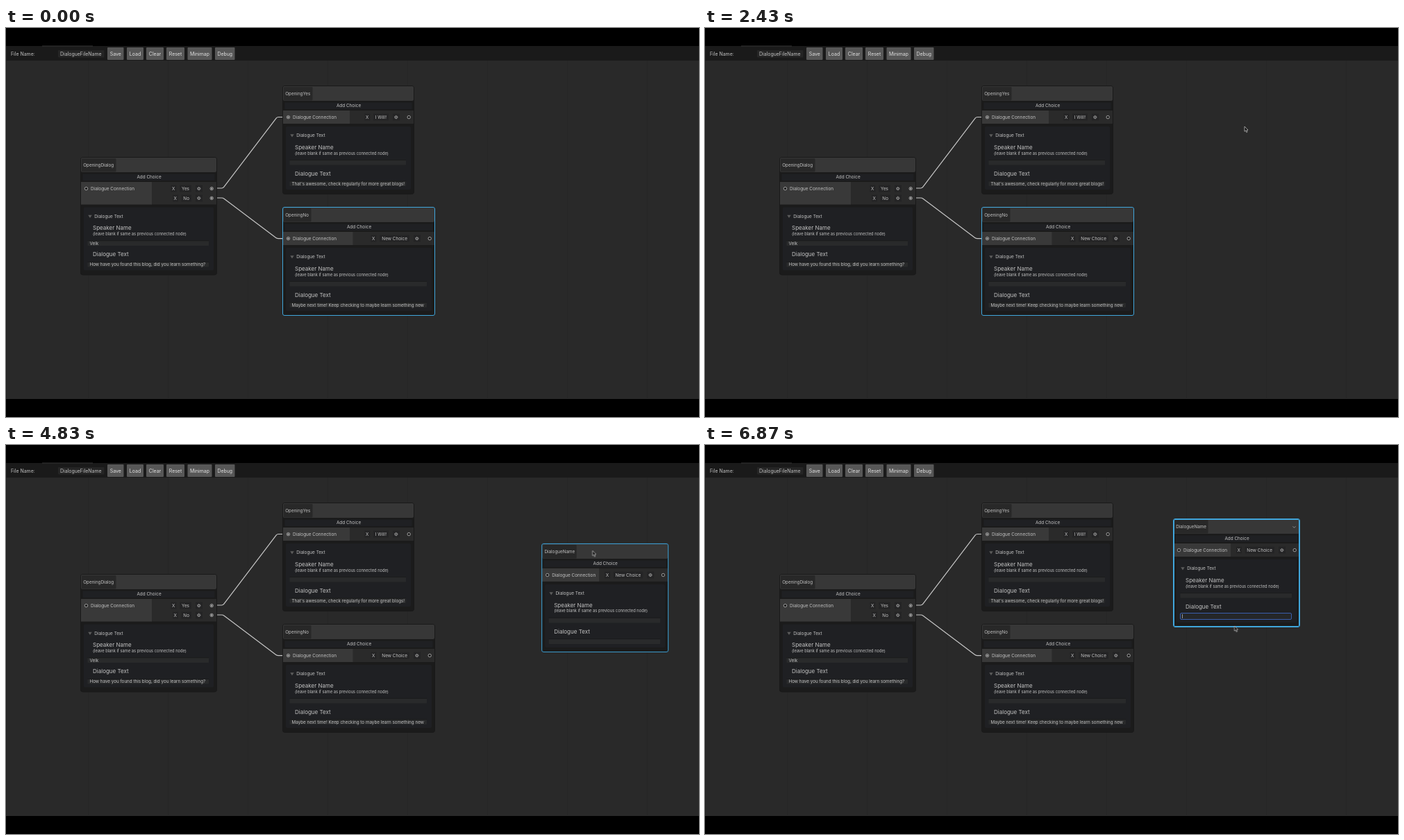
Animation of 998x561 px, one loop 8000 ms. Source, as an HTML page:

```html
<!DOCTYPE html>
<html lang="en">
<head>
<meta charset="utf-8">
<title>Dialogue graph</title>
<style>
html, body { margin: 0; width: 100%; height: 100%; overflow: hidden; background: #000; }
svg { display: block; width: 100vw; height: 100vh; }
text { font-family: Inter, sans-serif; fill: #c2c2c2; white-space: pre; }
.menu text { font-family: "Noto Sans", sans-serif; fill: #3b94c4; }
.menu .lit text { fill: #d9effa; }
.menu .off { fill: #26465f; }

/* One loop is 8 s, so 1% is 80 ms */
.cursor, .drag { animation: 8s linear infinite; }
.step, .row { animation: 8s step-end infinite; }
.cursor { animation-name: point; }
.drag { animation-name: drag; }
.arrow { animation-name: arrow; }
.beam { animation-name: beam; }
.menu { animation-name: menu; }
.row { animation-name: row; }
.fresh { animation-name: fresh; }
.ring-no { animation-name: ringNo; }
.ring-new { animation-name: ringNew; }
.fold-no, .inner-no { animation-name: hoverNo; }
.fold-new { animation-name: foldNew; }
.inner-new { animation-name: innerNew; }
.name-hover { animation-name: nameHover; }
.focus { animation-name: focus; }

@keyframes point {
  0%, 7.125% { transform: translate(560px, 402px); }
  10.5% { transform: translate(800px, 290px); animation-timing-function: ease-out; }
  13% { transform: translate(948px, 222px); animation-timing-function: ease-in-out; }
  17.125%, 17.875% { transform: translate(700px, 285px); animation-timing-function: ease-out; }
  20.5%, 22.5% { transform: translate(611px, 304.5px); animation-timing-function: ease-in-out; }
  27.875%, 28.375% { transform: translate(748px, 159px); animation-timing-function: ease-out; }
  30.375%, 33.375% { transform: translate(777px, 142px); }
  36% { transform: translate(795px, 165px); }
  40.875% { transform: translate(814px, 230.5px); }
  43.375%, 45% { transform: translate(836px, 246px); animation-timing-function: ease-in-out; }
  53.75%, 58% { transform: translate(850px, 152.5px); }
  60.375% { transform: translate(845px, 152.5px); }
  64.125% { transform: translate(750.5px, 118px); }
  65%, 65.5% { transform: translate(747.5px, 116.5px); }
  67.125%, 71.625% { transform: translate(699.5px, 125.5px); }
  76% { transform: translate(735px, 195px); animation-timing-function: ease-out; }
  80%, 82.5% { transform: translate(765px, 247px); }
  85.875%, 100% { transform: translate(762.5px, 261px); }
}
@keyframes drag {
  0%, 58% { transform: translate(102.5px, 36px); }
  60.375% { transform: translate(97.5px, 36px); }
  64.125% { transform: translate(3px, 1.5px); }
  65%, 100% { transform: none; }
}
@keyframes arrow {
  0% { opacity: 0; } 7.7% { opacity: 1; } 66.3% { opacity: 0; }
  72% { opacity: 1; } 79.3% { opacity: 0; } 83.5%, 100% { opacity: 1; }
}
@keyframes beam {
  0% { opacity: 0; } 7.125% { opacity: 1; } 7.7% { opacity: 0; }
  66.3% { opacity: 1; } 72% { opacity: 0; } 79.3% { opacity: 1; } 83.5%, 100% { opacity: 0; }
}
@keyframes menu { 0% { opacity: 0; } 33.375% { opacity: 1; } 45%, 100% { opacity: 0; } }
@keyframes row {
  0% { transform: translateY(-300px); }
  34% { transform: translateY(141px); }
  35.2% { transform: translateY(158px); }
  36.7% { transform: translateY(174px); }
  37.9% { transform: translateY(-300px); }
  39.1% { transform: translateY(206.5px); }
  40.3% { transform: translateY(224px); }
  42.5%, 100% { transform: translateY(241px); }
}
@keyframes fresh { 0% { opacity: 0; } 45%, 100% { opacity: 1; } }
@keyframes ringNo { 0% { opacity: 1; } 55%, 100% { opacity: 0; } }
@keyframes ringNew { 0% { opacity: .5; } 55%, 100% { opacity: 1; } }
@keyframes hoverNo { 0% { opacity: 0; } 7.125% { opacity: 1; } 8.1%, 100% { opacity: 0; } }
@keyframes foldNew { 0% { opacity: 1; } 55% { opacity: 0; } 65.5%, 100% { opacity: 1; } }
@keyframes innerNew { 0% { opacity: 0; } 65.5%, 100% { opacity: 1; } }
@keyframes nameHover { 0% { opacity: 0; } 66.3% { opacity: 1; } 72%, 100% { opacity: 0; } }
@keyframes focus { 0% { opacity: 0; } 80.5%, 100% { opacity: 1; } }
</style>
</head>
<body>
<svg id="stage" viewBox="0 0 998 561" preserveAspectRatio="none"></svg>
<script>
const rect = (x, y, w, h, fill, extra = '') =>
  `<rect x="${x}" y="${y}" width="${w}" height="${h}" fill="${fill}" ${extra}/>`;

// y is the middle of the capitals
const label = (str, x, y, size = 6.4, extra = '') =>
  `<text x="${x}" y="${y + size * 0.36}" font-size="${size}" ${extra}>${str}</text>`;

const MIDDLE = 'text-anchor="middle"';

const port = (x, y, linked) =>
  `<circle cx="${x}" cy="${y}" r="2.2" fill="#1c1c1c" stroke="#bcbcbc" stroke-width=".8"/>` +
  (linked ? `<circle cx="${x}" cy="${y}" r="1.2" fill="#c0c0c0"/>` : '');

const gear = (x, y) =>
  `<circle cx="${x}" cy="${y}" r="2.2" fill="none" stroke="#a4a4a4" stroke-width=".9" stroke-dasharray="1 .73"/>` +
  `<circle cx="${x}" cy="${y}" r="1.4" fill="none" stroke="#a4a4a4" stroke-width="1"/>`;

const field = (x, y, w, value) =>
  rect(x, y, w, 7.5, '#292a2b', 'rx="1"') +
  rect(x, y, w, 0.7, '#161617') +
  label(value, x + 3, y + 4, 6.3);

function choice(right, y, { text, width, linked }) {
  const start = right - 39 - width;
  const box = (x, w) => rect(x, y - 5, w, 10, '#242425', 'rx="1"');
  return box(start - 15.5, 8) + label('X', start - 11.7, y, 6.4, MIDDLE) +
    box(start - 3, width + 6) + label(text, right - 39, y, 6.4, 'text-anchor="end"') +
    box(right - 30, 10) + gear(right - 25.2, y) +
    port(right - 6.8, y, linked);
}

// The outer ring marks selection, the inner one thickens it on hover
function selection(x, y, w, h, tag) {
  const ring = (inset, cls) =>
    rect(x + inset, y + inset, w - 2 * inset, h - 2 * inset, 'none', `class="step ${cls}-${tag}" rx="${3 - inset}" stroke="#40a6dc"`);
  return ring(0.5, 'ring') + ring(1.5, 'inner') +
    `<path class="step fold-${tag}" d="M${x + w - 10.5} ${y + 11.3}l2 2 2-2" fill="none" stroke="#aaa" stroke-width=".8"/>`;
}

function node({ x, y, w, name, nameW, inW, linked, choices, speaker = '', line = '', tag }) {
  const grow = (choices.length - 1) * 13.5;
  const right = x + w;
  const b = y + grow;
  return rect(x - 0.5, y - 0.5, w + 1, 156 + grow, '#1b1b1b', 'rx="3" stroke="#191919"') +
    rect(x, y, w, 21, '#373737', 'rx="2"') +
    rect(x + 1, y + 1, nameW, 19.5, '#282828', 'rx="1"') +
    label(name, x + 3.3, y + 11, 6.3) +
    rect(x + 2.5, y + 23.5, w - 5, 9.5, '#1f2023', 'rx="1"') +
    label('Add Choice', x + w / 2 + 0.5, y + 28, 6.4, MIDDLE) +
    rect(x, y + 35, w, 19 + grow, '#2a2a2a') +
    rect(x, y + 35, inW, 19 + grow, '#393939') +
    port(x + 7.5, y + 44.6, linked) +
    label('Dialogue Connection', x + 14, y + 44.6) +
    choices.map((c, i) => choice(right, y + 44.6 + i * 13.8, c)).join('') +
    rect(x + 4, b + 58, w - 8, 91, '#1f2023', 'rx="2"') +
    `<path d="M${x + 10.3} ${b + 69.3}h5.4l-2.7 4.2z" fill="#5c5c5c"/>` +
    label('Dialogue Text', x + 19.3, b + 71) +
    label('Speaker Name', x + 17, b + 88, 8) +
    label('(leave blank if same as previous connected node)', x + 17, b + 96.5, 5.75) +
    field(x + 9.5, b + 106, w - 20.5, speaker) +
    label('Dialogue Text', x + 17, b + 126, 8) +
    field(x + 9.5, b + 136.5, w - 20.5, line) +
    (tag ? selection(x - 1, y - 1, w + 2, 157 + grow, tag) : '');
}

// A slanted link between two short stubs, with softened corners
function edge(y1, y2) {
  const [x1, x2] = [312.5, 390.3];
  const len = Math.hypot(x2 - x1, y2 - y1);
  const dx = (x2 - x1) / len * 2, dy = (y2 - y1) / len * 2;
  return `<path d="M304 ${y1}H${x1 - 2}Q${x1} ${y1} ${x1 + dx} ${y1 + dy}` +
    `L${x2 - dx} ${y2 - dy}Q${x2} ${y2} ${x2 + 2} ${y2}H399" fill="none" stroke="#c6c6c6" stroke-width="1.2"/>`;
}

const buttons = [['Save', 146, 23.5], ['Load', 174, 24], ['Clear', 202, 25],
  ['Reset', 231, 26], ['Minimap', 261.5, 35], ['Debug', 301, 28.5]];

const gridLines = Array.from({ length: 8 }, (_, i) => rect(118 + i * 115, 47, 0.8, 487, '#262626')).join('');

const backdrop =
  rect(0, 0, 998, 561, '#000') +
  rect(0, 26, 998, 508.5, '#292929') + gridLines +
  rect(0, 26, 998, 21, '#1a1a1a') +
  rect(52, 25.5, 73, 1, '#363636') +
  rect(0, 47, 0.8, 487, '#1d1d1d') +
  rect(0, 534, 998, 0.7, '#343434') +
  label('File Name:', 7, 37, 6.95) +
  rect(75, 32, 66.5, 10.5, '#252525', 'rx="1"') +
  label('DialogueFileName', 78, 37, 6.95) +
  buttons.map(([str, x, w]) =>
    rect(x, 28, w, 18, '#575757', 'rx="1"') +
    label(str, x + w / 2, 37, 6.95, MIDDLE + ' style="fill:#e2e2e2"')).join('');

const opening = node({
  x: 108, y: 187, w: 195, name: 'OpeningDialog', nameW: 49.5, inW: 102, speaker: 'Velk',
  line: 'How have you found this blog, did you learn something?',
  choices: [{ text: 'Yes', width: 11, linked: true }, { text: 'No', width: 8.5, linked: true }]
});
const yes = node({
  x: 399, y: 84, w: 188, name: 'OpeningYes', nameW: 41.5, inW: 96, linked: true,
  line: "That's awesome, check regularly for more great blogs!",
  choices: [{ text: 'I Will!', width: 16 }]
});
const no = node({
  x: 399, y: 259, w: 218, name: 'OpeningNo', nameW: 39.5, inW: 100.5, linked: true, tag: 'no',
  line: 'Maybe next time! Keep checking to maybe learn something new',
  choices: [{ text: 'New Choice', width: 37 }]
});
const added = node({
  x: 675, y: 107, w: 181, name: 'DialogueName', nameW: 48.5, inW: 82, tag: 'new',
  choices: [{ text: 'New Choice', width: 36.5 }]
}) +
  rect(676, 109, 48.5, 18, 'none', 'class="step name-hover" rx="1" stroke="#666" stroke-width=".8"') +
  `<g class="step focus">${rect(684.5, 242.5, 160, 9, '#252729', 'rx="1.5" stroke="#3a5fae"')}` +
  `${rect(687.3, 244, 0.7, 6, '#c8c8c8')}</g>`;

const items = [['Create Node', 149], ['Cut', 166], ['Copy', 182], ['Paste', 197.5, 'off'], ['Delete', 214.5],
  ['Duplicate', 232], ['Add Node (Multiple Choice)', 249], ['Add Group', 265]];
const itemLabels = items.map(([str, y, cls = '']) => label(str, 792.7, y, 7.4, `class="${cls}"`)).join('');
const rowRect = rect(776.8, 0, 128, 16, '#41aadd', 'class="row"');

const menu = `<clipPath id="rowClip">${rowRect}</clipPath><g class="step menu">` +
  rect(776, 140.5, 129.5, 132.5, '#141727', 'stroke="#1b2037" stroke-width=".8"') +
  [157.5, 206, 223, 240.5].map(y => rect(777, y, 128, 0.8, '#1d4560')).join('') +
  itemLabels + rowRect + `<g class="lit" clip-path="url(#rowClip)">${itemLabels}</g></g>`;

const cursor = `<g class="cursor">
  <path class="step arrow" d="M0 0V7.2L1.6 5.8 2.8 8.5 4.1 7.9 2.9 5.4 5 5.1Z" fill="#111" stroke="#d0d0d0" stroke-width=".7"/>
  <path class="step beam" d="M-1.8 -4.5H1.8M0 -4.5V4.5M-1.8 4.5H1.8" fill="none" stroke="#e0e0e0" stroke-width=".9"/></g>`;

document.getElementById('stage').innerHTML = backdrop + edge(231, 128.5) + edge(245, 303.6) +
  opening + yes + no + `<g class="step fresh"><g class="drag">${added}</g></g>` + menu + cursor;
</script>
</body>
</html>
```
